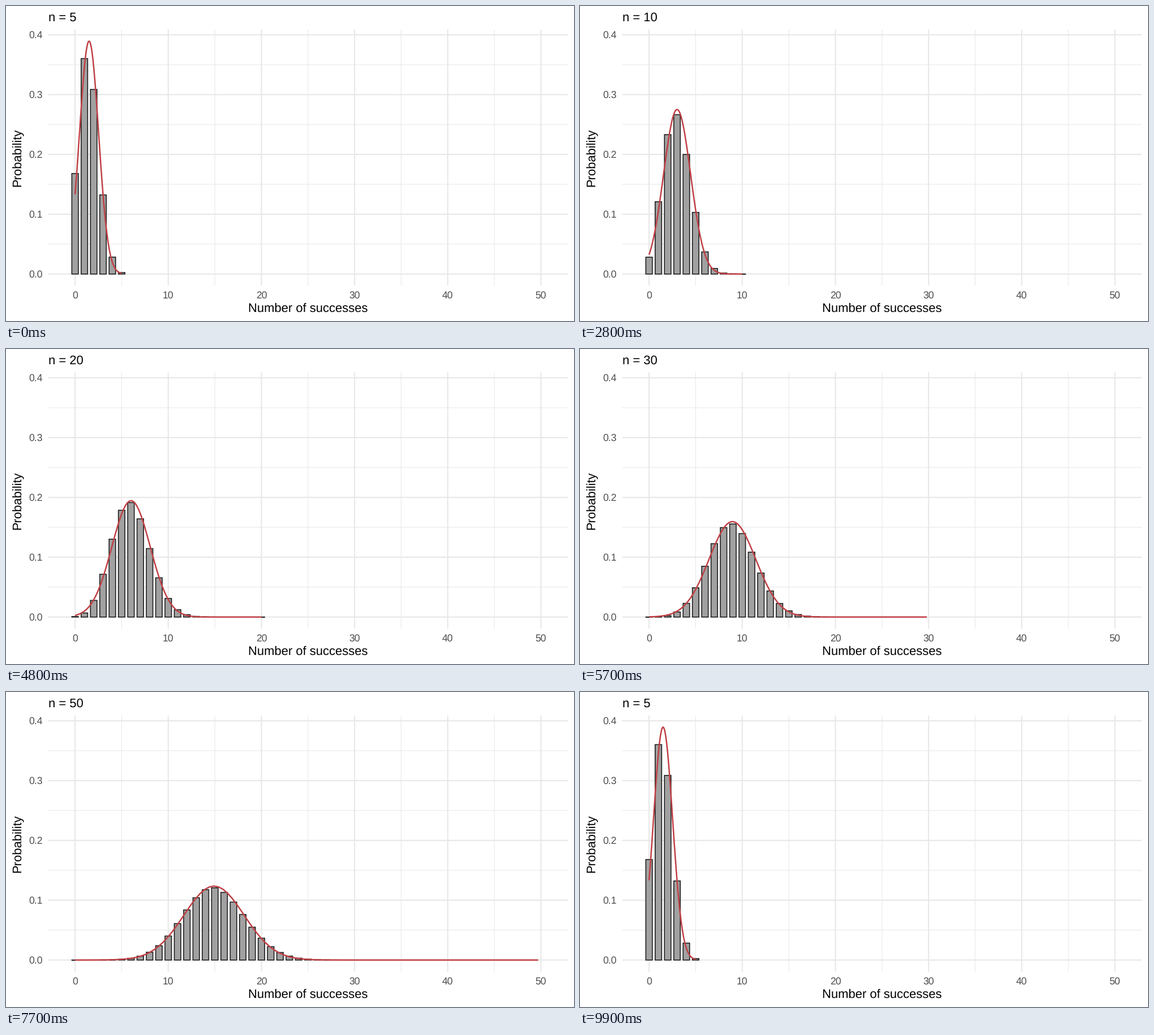
These frames come from a looping animation (1004x558 px, 10000 ms). A matplotlib script:

```python
from math import comb, pi, sqrt

import matplotlib.pyplot as plt
import numpy as np
from matplotlib.animation import FuncAnimation
from matplotlib.collections import PolyCollection

plt.rcParams["font.family"] = "Liberation Sans"
plt.rcParams["text.hinting"] = "none"

W, H, DPI = 1004, 558, 64
PT = 72 / DPI  # points per pixel
LEFT, RIGHT, TOP, BOTTOM = 74.6, 993, 41.6, 495.4
P = 0.3
SIZES = [5, 10, 20, 30, 50]
# first frame and length of the move away from each size
MOVES = [(6, 14), (27, 13), (47, 12), (66, 13), (86, 13)]


def px(x):
    return 122.1 + 16.468 * np.asarray(x)


def py(y):
    return 474.8 - 1059.5 * np.asarray(y)


def binomial(n):
    return np.array([comb(n, k) * P**k * (1 - P) ** (n - k) for k in range(n + 1)])


def normal(n):
    x = np.linspace(0, n, 101)
    var = n * P * (1 - P)
    return np.array([x, np.exp(-((x - n * P) ** 2) / (2 * var)) / sqrt(2 * pi * var)])


BARS = [binomial(n) for n in SIZES]
CURVES = [normal(n) for n in SIZES]


def ease(u):
    return 4 * u**3 if u < 0.5 else 1 - 4 * (1 - u) ** 3


def pose(frame):
    """Return the size now, the next size and the eased progress between them."""
    for i, (start, length) in enumerate(MOVES):
        if frame < start + length:
            return i, (i + 1) % len(SIZES), ease(max(0, frame - start) / length)
    return 0, 1, 0


def bar_heights(a, b, t):
    # bars without a partner come and go only when the move ends
    heights = BARS[a].copy()
    m = min(len(heights), len(BARS[b]))
    heights[:m] += t * (BARS[b][:m] - heights[:m])
    return heights


def bar_corners(k, h):
    x0, x1, y0, y1 = px(k - 0.35), px(k + 0.35), py(0), py(h)
    return [(x0, y0), (x0, y1), (x1, y1), (x1, y0)]


fig = plt.figure(figsize=(W / DPI, H / DPI), dpi=DPI, facecolor="white")
ax = fig.add_axes([0, 0, 1, 1])
ax.set(xlim=(0, W), ylim=(H, 0))
ax.axis("off")


def label(x, y, text, size=22, color="black", ha="center", **kw):
    return ax.text(x, y, text, fontsize=size * PT, color=color, ha=ha, va="baseline", **kw)


def grid(xs, ys, width):
    style = dict(color="#e8e8e8", lw=width * PT, solid_capstyle="butt", snap=False, zorder=1)
    for x in px(xs):
        ax.plot([x, x], [TOP, BOTTOM], **style)
    for y in py(ys):
        ax.plot([LEFT, RIGHT], [y, y], **style)


x_ticks = np.arange(0, 51, 10)
y_ticks = np.arange(5) / 10
grid(x_ticks[:-1] + 5, y_ticks[:-1] + 0.05, 1.07)
grid(x_ticks, y_ticks, 2.13)

for x in x_ticks:
    label(px(x), 518, str(x), 17.6, "#4d4d4d")
for y in y_ticks:
    label(64.9, py(y) + 6.3, f"{y:.1f}", 17.6, "#4d4d4d", "right")
label((LEFT + RIGHT) / 2, 543, "Number of successes")
label(26.7, (TOP + BOTTOM) / 2, "Probability", rotation=90, rotation_mode="anchor")
title = label(LEFT, 26.4, "", ha="left")

bars = PolyCollection([], facecolor="#a1a1a1", edgecolor="#1c1c1c", linewidth=1.6 * PT,
                      joinstyle="miter", snap=False, zorder=2)
ax.add_collection(bars, autolim=False)
(curve,) = ax.plot([], [], color="#c04045", lw=2.5 * PT, solid_capstyle="butt",
                   solid_joinstyle="round", snap=False, zorder=3)


def update(frame):
    a, b, t = pose(frame)
    title.set_text(f"n = {SIZES[b if t > 0.5 else a]}")
    bars.set_verts([bar_corners(k, h) for k, h in enumerate(bar_heights(a, b, t))])
    x, y = (1 - t) * CURVES[a] + t * CURVES[b]
    curve.set_data(px(x), py(y))
    return bars, curve, title


anim = FuncAnimation(fig, update, frames=100, interval=100, repeat=True, repeat_delay=0)
plt.show()
```
